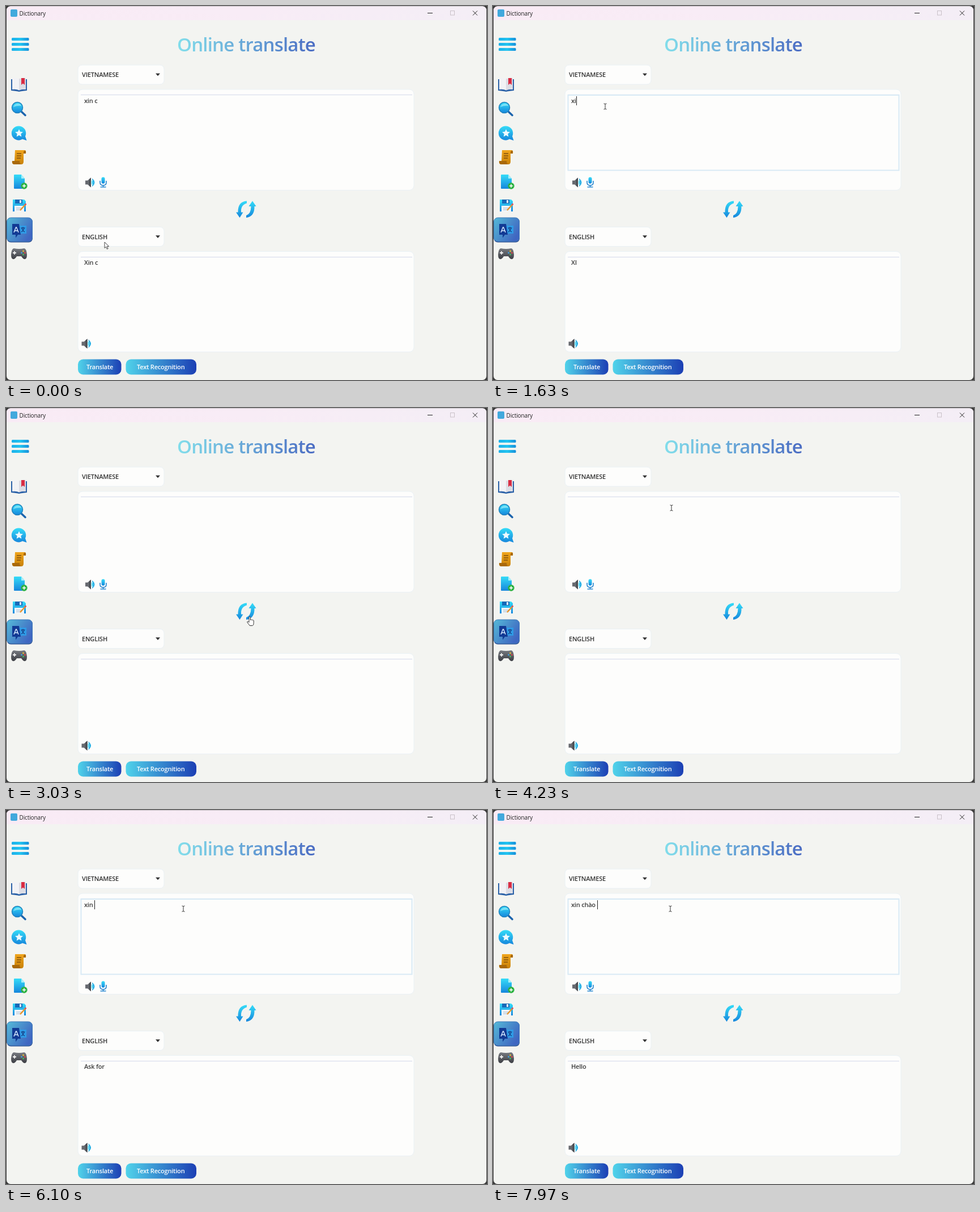
Animation, 849 px wide and 659 px high, one loop 8 s. Source, as an HTML page:

```html
<!DOCTYPE html>
<html lang="en">
<head>
<meta charset="utf-8">
<title>Dictionary</title>
<style>
  html, body { margin: 0; width: 100%; height: 100%; overflow: hidden; background: #3a3a3a; }
  #stage { position: relative; width: 849px; height: 659px; overflow: hidden; }
  svg { position: absolute; left: 0; top: 0; }
  text, .field { font: 600 11px/16px "Open Sans", "Noto Sans", sans-serif; letter-spacing: -.2px; fill: #333; color: #3a3a3a; }
  .field { position: absolute; left: 138px; white-space: pre; }
  #input { top: 158.7px; }
  #output { top: 444.4px; }
  #caret { display: inline-block; width: 1px; height: 16px; background: #222; vertical-align: top; }
  #title { font-size: 33px; letter-spacing: -.8px; fill: url(#titleFill); }
  #appName { font-size: 10px; font-weight: 400; letter-spacing: -.12px; fill: #222; }
  .card { fill: #fdfdfc; stroke: #eaf1f5; }
  .rule { stroke: #dfe2ef; stroke-width: 1.5; }
  .button text { fill: #fff; }
</style>
</head>
<body>
<div id="stage">
<svg width="849" height="659" viewBox="0 0 849 659">
  <defs>
    <linearGradient id="bar"><stop stop-color="#f9ebf5"/><stop offset=".5" stop-color="#f8ecf6"/><stop offset="1" stop-color="#f4eef6"/></linearGradient>
    <linearGradient id="titleFill"><stop stop-color="#82deeb"/><stop offset="1" stop-color="#4b6cc3"/></linearGradient>
    <linearGradient id="buttonFill"><stop stop-color="#50d3ea"/><stop offset="1" stop-color="#1c3fb4"/></linearGradient>
    <linearGradient id="tile" x2="1" y2=".6"><stop stop-color="#55bad8"/><stop offset="1" stop-color="#3f66c1"/></linearGradient>
    <linearGradient id="cyan" x2="0" y2="1"><stop stop-color="#35dcf8"/><stop offset="1" stop-color="#1686dc"/></linearGradient>
    <linearGradient id="stripe"><stop stop-color="#1ab0ea"/><stop offset=".5" stop-color="#22c4f0"/><stop offset="1" stop-color="#178fda"/></linearGradient>
    <linearGradient id="gold" x2="0" y2="1"><stop stop-color="#f0a51d"/><stop offset="1" stop-color="#c98208"/></linearGradient>
    <linearGradient id="pad" x2="0" y2="1"><stop stop-color="#777a80"/><stop offset="1" stop-color="#3c3e44"/></linearGradient>
    <g id="speaker">
      <path d="M0 5h4l6-5v17l-6-5H0z" fill="#66696f"/>
      <path d="M7 2.500l3-2.500v17l-3-2.500z" fill="#484b50"/>
      <path d="M11 4q4 4.500 0 9z" fill="#39d6f5"/>
      <path d="M12.500 2q7 6.500 0 13q3-6.500 0-13z" fill="#20aee6" stroke="#20aee6"/>
    </g>
    <path id="drop" d="M0 0h8l-4 4.600z" fill="#333"/>
  </defs>

  <rect x="1" y=".5" width="847" height="658.500" rx="7" fill="#f3f4f1"/>
  <path d="M1 25V7.500a7 7 0 0 1 7-7h833a7 7 0 0 1 7 7V25z" fill="url(#bar)"/>
  <rect x="8" y="6" width="12" height="13" rx="2" fill="#42a9dd"/>
  <text id="appName" x="23.500" y="16.500">Dictionary</text>
  <path d="M744 12.500h9M824 8.500l8 8m0-8l-8 8" stroke="#222" fill="none"/>
  <rect x="784.500" y="8.500" width="7" height="7.500" fill="none" stroke="#c9c1c8"/>
  <text id="title" x="302" y="79.500">Online translate</text>

  <!-- sidebar -->
  <g fill="url(#stripe)">
    <rect x="10" y="56" width="30.500" height="5" rx="1.500"/>
    <rect x="10" y="65" width="30.500" height="5" rx="1.500"/>
    <rect x="10" y="74" width="30.500" height="5" rx="1.500"/>
  </g>
  <g>
    <path d="M9 129h28v20q-10 1-14 2q-4-1-14-2z" fill="#2c62a8"/>
    <path d="M11 127q7-1 12 1.500q5-2.500 12-1.500v20q-8-1-12 1.500q-4-2.500-12-1.500z" fill="#f2f2f5"/>
    <path d="M23 128.500q5-2.500 12-1.500v20q-8-1-12 1.500z" fill="#dcdde5"/>
    <path d="M27 127h6v12l-3-2.500l-3 2.500z" fill="#d92c43"/>
  </g>
  <g>
    <path d="M26 185l8 7.500" stroke="#1b64ad" stroke-width="3.500" stroke-linecap="round"/>
    <circle cx="20" cy="179" r="9.500" fill="url(#cyan)" stroke="#2283bc" stroke-width="1.500"/>
    <path d="M13 178q2-6 8-6q5 0 6 4q-7-1-14 2z" fill="#a5eef9" opacity=".65"/>
  </g>
  <path d="M23 211.500a12.500 12.500 0 0 1 11 18l2.500 7.500l-7.500-2.500A12.500 12.500 0 1 1 23 211.500z" fill="url(#cyan)"/>
  <path d="M23 217l2 4.500l5 .5l-3.700 3.300l1 5L23 227.700l-4.300 2.600l1-5L16 222l5-.5z" fill="#eefaff"/>
  <g>
    <path d="M16 254h17q3 1 2 6h-4v14q0 5-4 5H14q-4-1-3-6h4z" fill="url(#gold)"/>
    <path d="M31 260v-3q1-3 4-2v5zM11 273h13q0 5 3 6H14q-4-1-3-6z" fill="#a9690a"/>
    <path d="M19 260h8m-8 4h8m-8 4h7" stroke="#81500c" stroke-width="1.400"/>
  </g>
  <g>
    <path d="M14 298q0-1 1-1h12l6 7v17q0 1-1 1H15q-1 0-1-1z" fill="url(#cyan)"/>
    <path d="M27 297l6 7h-6z" fill="#a4effa"/>
    <circle cx="32" cy="317" r="5.700" fill="#2fb344"/>
    <path d="M29 317h6m-3-3v6" stroke="#fff" stroke-width="1.500"/>
  </g>
  <g>
    <path d="M12 341h20l3 3v18H12z" fill="url(#cyan)"/>
    <path d="M16 341h13v7H16z" fill="#1769b8"/>
    <path d="M24 342h3v5h-3zM15 352h17v10H15z" fill="#f0f5fa"/>
    <path d="M18 356h10m-10 3h7" stroke="#a4b6c8"/>
    <path d="M25 360l9-10" stroke="#e8942a" stroke-width="2.500"/>
    <path d="M33.500 350.500l2-2" stroke="#dc4a5a" stroke-width="2.500"/>
  </g>
  <rect x="1.500" y="374" width="45.500" height="42.500" rx="7" fill="#2c4a8e"/>
  <rect x="1.500" y="373" width="45" height="42" rx="7" fill="url(#tile)" stroke="#3e78b8"/>
  <path d="M24 387h12v14H24z" fill="#2f9be6"/>
  <path d="M11 384h12l3 19h-5l-4 5.500v-5.500h-6z" fill="#123a94"/>
  <path d="M14 399l3.500-9h1l3.500 9m-6.500-3h5" stroke="#d9ecff" stroke-width="1.400" fill="none"/>
  <path d="M26.500 391h7m-3.500-1.500v1.500m2 0q-1 5-5 7m1-7q1 5 5 7" stroke="#102d72" stroke-width="1.200" fill="none"/>
  <g>
    <path d="M14 427q9 2 18 0q4 0 5 11q0 8-4 8q-3 0-6-5h-8q-3 5-6 5q-4 0-4-8q1-11 5-11z" fill="url(#pad)"/>
    <path d="M12 435h6m-3-3v6" stroke="#f0f0f0" stroke-width="1.800"/>
    <circle cx="30.500" cy="432" r="1.400" fill="#e7bd35"/><circle cx="33.500" cy="435" r="1.400" fill="#df4a4a"/>
    <circle cx="27.500" cy="435" r="1.400" fill="#42a4e2"/><circle cx="30.500" cy="438" r="1.400" fill="#46bd60"/>
  </g>

  <!-- translation panels -->
  <rect class="card" x="127" y="104" width="152" height="34" rx="7"/>
  <text x="134" y="125">VIETNAMESE</text>
  <use href="#drop" x="264" y="118.700"/>
  <rect class="card" x="127" y="147" width="593" height="177.500" rx="8"/>
  <path class="rule" d="M132 156.500h585"/>
  <rect id="focus" x="132.500" y="157" width="584" height="132.500" fill="none" stroke="#d8eaf5" stroke-width="2"/>
  <use href="#speaker" x="140" y="302.500"/>
  <rect x="168.500" y="301.500" width="6" height="11.500" rx="3" fill="url(#cyan)"/>
  <path d="M166 308v3q0 5 5.500 5t5.500-5v-3m-5.500 8v3m-5 0h10" fill="none" stroke="#2585cf" stroke-width="1.600"/>

  <path d="M425 343.500q-16 1-15.500 20h-3.500l6.500 9.500l6-9.500h-3.500q-1-13 10-16z" fill="url(#cyan)"/>
  <path d="M424 373q15-2 14.500-20h3l-6.500-9.500l-6.500 9.500h4q0 13-8.500 16z" fill="url(#cyan)"/>

  <rect class="card" x="127" y="389.500" width="152" height="34" rx="7"/>
  <text x="134" y="410.500">ENGLISH</text>
  <use href="#drop" x="264" y="404.300"/>
  <rect class="card" x="127" y="432.500" width="593" height="177" rx="8"/>
  <path class="rule" d="M132 442.500h585"/>
  <use href="#speaker" x="133.500" y="586.500"/>

  <g class="button">
    <rect x="127" y="622.500" width="76.500" height="27" rx="9" fill="url(#buttonFill)"/>
    <text x="142" y="639.700">Translate</text>
    <rect x="211.500" y="622.500" width="124.500" height="27" rx="9" fill="url(#buttonFill)"/>
    <text x="231" y="639.700">Text Recognition</text>
  </g>
</svg>
<div class="field" id="input"><span id="typed"></span><span id="caret"></span></div>
<div class="field" id="output"></div>
<svg width="849" height="659" viewBox="0 0 849 659">
  <g id="pointer">
    <path id="arrow" d="M0 0v10.500l2.500-2.200l1.800 4l1.800-.8l-1.800-3.900h3.400z" fill="#fff" stroke="#333" stroke-width=".9"/>
    <path id="beam" d="M-2.500-5q2 0 2.500 1q.5-1 2.500-1M0-4v8m-2.500 1q2 0 2.500-1q.5 1 2.500 1" fill="none" stroke="#333"/>
    <path id="hand" d="M-2 1q0-1.500 1.200-1.500t1.200 1.500v4.500q1-1.200 2 0q1.200-.8 2 .3q1.400-.5 1.800.9v4q0 4-2 4.800h-5q-1.200-2-4.200-5.500q-.8-1.800.8-1.800q.8 0 2.200 1.500z" fill="#fff" stroke="#333"/>
  </g>
</svg>
</div>
<script>
const LOOP = 8000;
const path = [
  [0, 174, 416], [620, 198, 177], [2100, 198, 177], [2700, 431, 368],
  [3400, 431, 368], [4050, 315, 176], [4450, 315, 176], [4600, 313, 174], [LOOP, 313, 174]
];
const focusChanges = [[0, false], [650, true], [2850, false], [4700, true]];
const typing = [
  [0, "xin c"], [1150, "xin "], [1350, "xin"], [1550, "xi"], [1750, "x"], [1920, ""],
  [5000, "x"], [5220, "xi"], [5450, "xin"], [5750, "xin "],
  [6500, "xin c"], [6720, "xin ch"], [6940, "xin cha"], [7160, "xin chao"],
  [7380, "xin chào"], [7650, "xin chào "]
];
const results = [
  [0, "Xin c"], [1220, "Ask for"], [1600, "XI"], [1800, "X"], [1970, ""],
  [5070, "X"], [5290, "XI"], [5520, "Ask for"],
  [6570, "Xin c"], [6790, "Xin ch"], [7010, "Xin cha"], [7230, "Hello"]
];
const el = id => document.getElementById(id);
const latest = (steps, t) => steps.findLast(step => step[0] <= t);

function pointerAt(t) {
  const i = path.findLastIndex(p => p[0] <= t);
  const [t0, x0, y0] = path[i], [t1, x1, y1] = path[i + 1];
  const u = (t - t0) / (t1 - t0), ease = u * u * (3 - 2 * u);
  return [x0 + (x1 - x0) * ease, y0 + (y1 - y0) * ease];
}

function pointerShape(x, y) {
  if (x > 132 && x < 717 && y > 157 && y < 290) return "beam";
  if (x > 405 && x < 442 && y > 343 && y < 374) return "hand";
  return "arrow";
}

function draw(t) {
  const [x, y] = pointerAt(t), shape = pointerShape(x, y);
  el("pointer").setAttribute("transform", `translate(${x} ${y})`);
  for (const id of ["arrow", "beam", "hand"]) el(id).style.display = id === shape ? "" : "none";

  const [focusTime, focused] = latest(focusChanges, t);
  const [typeTime, typed] = latest(typing, t);
  const idle = t - Math.max(focusTime, typeTime);
  el("focus").style.display = focused ? "" : "none";
  el("caret").style.visibility = focused && idle % 1000 < 500 ? "visible" : "hidden";
  el("typed").textContent = typed;
  el("output").textContent = latest(results, t)[1];
}

const start = performance.now();
function tick() {
  draw((performance.now() - start) % LOOP);
  requestAnimationFrame(tick);
}
tick();
</script>
</body>
</html>
```
